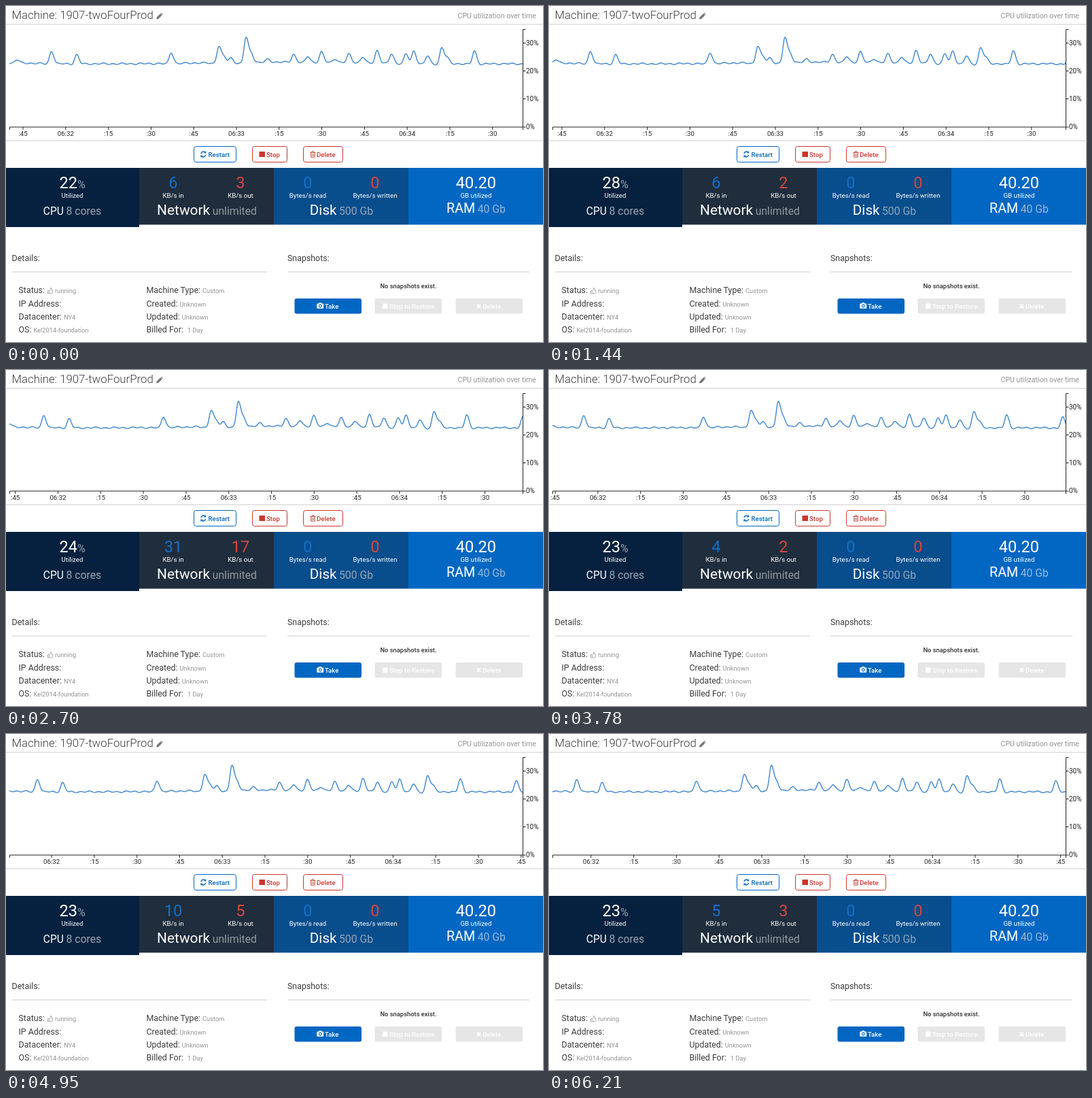
Animation, 790 px wide and 494 px high, one loop 6300 ms. Source, as an HTML page:

```html
<!DOCTYPE html>
<html lang="en">
<head>
<meta charset="utf-8">
<title>Machine monitor</title>
<style>
html, body { margin: 0; width: 100%; height: 100%; overflow: hidden; background: #fff; }
svg { display: block; width: 790px; height: 494px; font-family: Roboto, Inter, sans-serif; }
</style>
</head>
<body>
<svg id="stage" viewBox="0 0 790 494">
  <defs><clipPath id="plot"><rect x="5" y="30" width="755.5" height="148"/></clipPath></defs>
  <path d="M0 27H790M0 198H790M9 391H384M414 391H770" fill="none" stroke="#ccc"/>
  <path id="curve" clip-path="url(#plot)" fill="none" stroke="#3f86cf" stroke-width="1.4" stroke-linejoin="round"/>
  <path d="M5.5 182V178H760.5V182M764.5 34.5H760.5V178H764.5M760.5 54.5h4M760.5 95.5h4M760.5 136.5h4" fill="none" stroke="#222"/>
  <g id="ticks"></g>
  <g id="shapes"></g>

  <!-- icons -->
  <path d="M221 19.500l.8-3 5.400-5.400 2.400 2.400-5.400 5.400zM227.800 10.500l.8-.7 2.200 2.200-.7.900z" fill="#777"/>
  <g fill="none" stroke="#0267c2" stroke-width="1.500">
    <path d="M287 217a3.400 3.400 0 0 1 6-1.700M293.600 219a3.400 3.400 0 0 1-6 1.700"/>
    <path d="M294 213.500v2.700h-2.700zM286.600 222.500v-2.700h2.700z" fill="#0267c2" stroke-width=".4"/>
  </g>
  <rect x="372.500" y="214" width="8.500" height="8" fill="#c9372c"/>
  <path d="M447.500 215.500h8M450 215v-1.200h3v1.200M448.700 216v6.200h5.600V216M450.500 217.500v3.300M452.500 217.500v3.300" fill="none" stroke="#c9372c" stroke-width=".9"/>
  <path d="M61.500 418.500h2v4.500h-2zM63.500 418.500l2-2.300.3-1.800q1.700 0 1 3.400h2l-.6 5.100h-3.400l-1.300-.6" fill="none" stroke="#999" stroke-width=".8"/>
  <path d="M458 437.500h2l.8-1.500h2.900l.8 1.500h2q.7 0 .7.700v5.800q0 .7-.7.700H458q-.7 0-.7-.7v-5.800q0-.7.7-.7z" fill="#fff"/>
  <circle cx="462.300" cy="441" r="1.900" fill="none" stroke="#0267c2" stroke-width="1.100"/>
  <rect x="554" y="437.500" width="7.500" height="7.500" fill="#fff"/>
  <path d="M693 438.500l5 5.500M698 438.500l-5 5.500" stroke="#fff" stroke-width="1.900"/>
  <g id="labels"></g>
</svg>
<script>
const NS = "http://www.w3.org/2000/svg";
const LOOP = 6300, STEP = 90;
const SPEED = 4.19 / 1000;            // chart scroll, px per ms
const LEFT = 5.2, RIGHT = 760.6;
const DARK = "#3c3c3c", GRAY = "#929292", INK = "#222", WHITE = "#fff";
const BLUE = "#0267c2", RED = "#c9372c", IN = "#1470c8", OUT = "#d8463c";
const byId = id => document.getElementById(id);

function add(parent, name, attrs) {
  const el = document.createElementNS(NS, name);
  for (const key in attrs) el.setAttribute(key, attrs[key]);
  return parent.appendChild(el);
}

function rect(x, y, width, height, attrs) {
  add(byId("shapes"), "rect", { x, y, width, height, ...attrs });
}

function label(str, x, y, size, fill, { anchor = "start", weight = 400, parent = byId("labels") } = {}) {
  const el = add(parent, "text", {
    x, y, fill, "font-size": size, "font-weight": weight, "text-anchor": anchor
  });
  add(el, "tspan", {}).textContent = str;
  return el;
}

function append(el, str, size, fill, dx) {
  add(el, "tspan", { "font-size": size, fill, dx }).textContent = str;
}

const MID = { anchor: "middle" }, BOLD = { weight: 500 };

label("Machine: 1907-twoFourProd", 8.5, 19, 16.8, DARK, { weight: 300 });
label("CPU utilization over time", 780, 17.5, 10.6, GRAY, { anchor: "end" });
for (let i = 0; i < 4; i++) label(30 - i * 10 + "%", 765, 58 + i * 41, 10, INK);

// buttons: text, box x, box width, text x
for (const [str, x, w, tx, color] of [
  ["Restart", 276.5, 62, 297.5, BLUE], ["Stop", 362.5, 51, 383, RED], ["Delete", 437.5, 58, 457, RED]
]) {
  rect(x, 206.5, w, 23, { rx: 3, fill: WHITE, stroke: color });
  label(str, tx, 221.5, 9.7, color, BOLD);
}
for (const [str, x, tx, fill] of [
  ["Take", 424.5, 469, BLUE], ["Stop to Restore", 542.5, 564, "#e6e6e6"], ["Delete", 661.5, 701, "#e6e6e6"]
]) {
  rect(x, 430, 98.5, 22.5, { rx: 3, fill });
  label(str, tx, 444.5, 9.6, WHITE, BOLD);
}

// stat tiles; each stat is value, unit, colour
const tiles = [
  { name: "CPU", size: 15.6, spec: "8 cores", fill: "#06213f", tint: "#9ba5b1", h: 87,
    stats: [["22", "Utilized", WHITE]] },
  { name: "Network", size: 20.9, spec: "unlimited", fill: "#1f2d3d", tint: "#949a9f",
    stats: [["6", "KB/s in", IN], ["3", "KB/s out", OUT]] },
  { name: "Disk", size: 20.6, spec: "500 Gb", fill: "#084d8c", tint: "#93a6b8",
    stats: [["0", "Bytes/s read", IN], ["0", "Bytes/s written", OUT]] },
  { name: "RAM", size: 19.7, spec: "40 Gb", fill: BLUE, tint: "#9ab6d3", base: 304,
    stats: [["40.20", "GB utilized", WHITE]] }
];
const values = tiles.flatMap(({ name, size, spec, fill, tint, stats, h = 83.5, base = 307 }, i) => {
  const x = Math.max(0, 198 * i - 2), cx = 97.5 + 198 * i;
  rect(x, 238, 198 * (i + 1) - 2 - x + (i === 3 ? 2 : 0), h, { fill });
  append(label(name, cx, base, size, WHITE, MID), spec, 15.8, tint, 3.5);
  return stats.map(([value, unit, color], k) => {
    const sx = cx + (k - (stats.length - 1) / 2) * 99;
    label(unit, sx, 282, 9.7, WHITE, MID);
    const el = label(value, sx, 268, 23.6, color, MID);
    if (!i) append(el, "%", 16, tint, 0);
    return el.firstChild;
  });
});

// details
label("Details:", 8.5, 375, 12.5, DARK);
label("Snapshots:", 414, 375, 12.4, DARK);
label("No snapshots exist.", 592, 414.5, 9.4, "#333", { ...MID, weight: 500 });
[
  ["Status:", "running", 15], ["IP Address:", ""], ["Datacenter:", "NY4"], ["OS:", "Kel2014-foundation"],
  ["Machine Type:", "Custom"], ["Created:", "Unknown"], ["Updated:", "Unknown"], ["Billed For:", "1 Day", 6]
].forEach(([key, value, gap = 3], i) => {
  const el = label(key, i < 4 ? 18.5 : 206.5, 422.3 + i % 4 * 19.3, 12.4, DARK);
  append(el, value, 9.3, GRAY, gap);
});

// load spikes: x, height
const SPIKES = [
  [16, 5], [67, 18], [104, 13], [243, 16], [313, 24], [331, 7], [353, 36], [385, 4],
  [423, 11], [444, 8], [464, 15], [484, 5], [504.5, 12], [524.5, 8], [546, 18], [567, 13],
  [588.5, 14], [600, 18], [620, 11], [641, 23], [689, 19], [771.5, 15]
];
const bell = (d, width) => Math.exp(-d * d / (2 * width * width));

function spike(d, h) {
  const shoulder = h > 20 ? 0.38 * h * bell(d - 8, 3.4) : 0;
  return h * 1.08 * bell(d, d < 0 ? 2.9 : 3.5) + shoulder - 0.08 * h * bell(d, 9);
}

function loadY(x) {
  const drift = 1.4 * Math.cos((x - 150) / 91);
  const wobble = 0.8 * Math.sin(x * 0.47) + 0.5 * Math.sin(x * 0.21);
  return 83.6 + drift + wobble - SPIKES.reduce((sum, [sx, h]) => sum + spike(x - sx, h), 0);
}
const load = Array.from({ length: 790 }, (_, x) => [x, loadY(x)]);

const ticks = Array.from({ length: 13 }, (_, i) => {
  const sec = 45 + i * 15;
  const name = sec % 60 ? ":" + sec % 60 : "06:" + (31 + sec / 60);
  const g = add(byId("ticks"), "g", {});
  add(g, "path", { d: "M0 178v4", stroke: INK });
  label(name, 0, 190.5, 9.7, INK, { ...MID, parent: g });
  return { g, x: 25 + i * 62.8 };
});

// one reading per second: CPU %, KB/s in, KB/s out
const READINGS = ["22 6 3", "28 6 2", "24 31 17", "23 4 2", "23 10 5", "23 10 5", "23 5 3"];

function draw(ms) {
  const t = Math.floor(ms % LOOP / STEP) * STEP;
  const shift = t * SPEED;
  const pts = load.map(([x, y]) => (x - shift).toFixed(2) + " " + y.toFixed(2));
  byId("curve").setAttribute("d", "M" + pts.join("L"));
  for (const { g, x } of ticks) {
    const px = x - shift;
    g.setAttribute("transform", `translate(${px.toFixed(2)} 0)`);
    g.setAttribute("visibility", px >= LEFT && px <= RIGHT ? "visible" : "hidden");
  }
  const now = READINGS[Math.floor((t + 200) / 1000)].split(" ");
  now.forEach((value, i) => { values[i].textContent = value; });
}

const start = performance.now();
function loop() {
  draw(performance.now() - start);
  requestAnimationFrame(loop);
}
loop();
</script>
</body>
</html>
```
